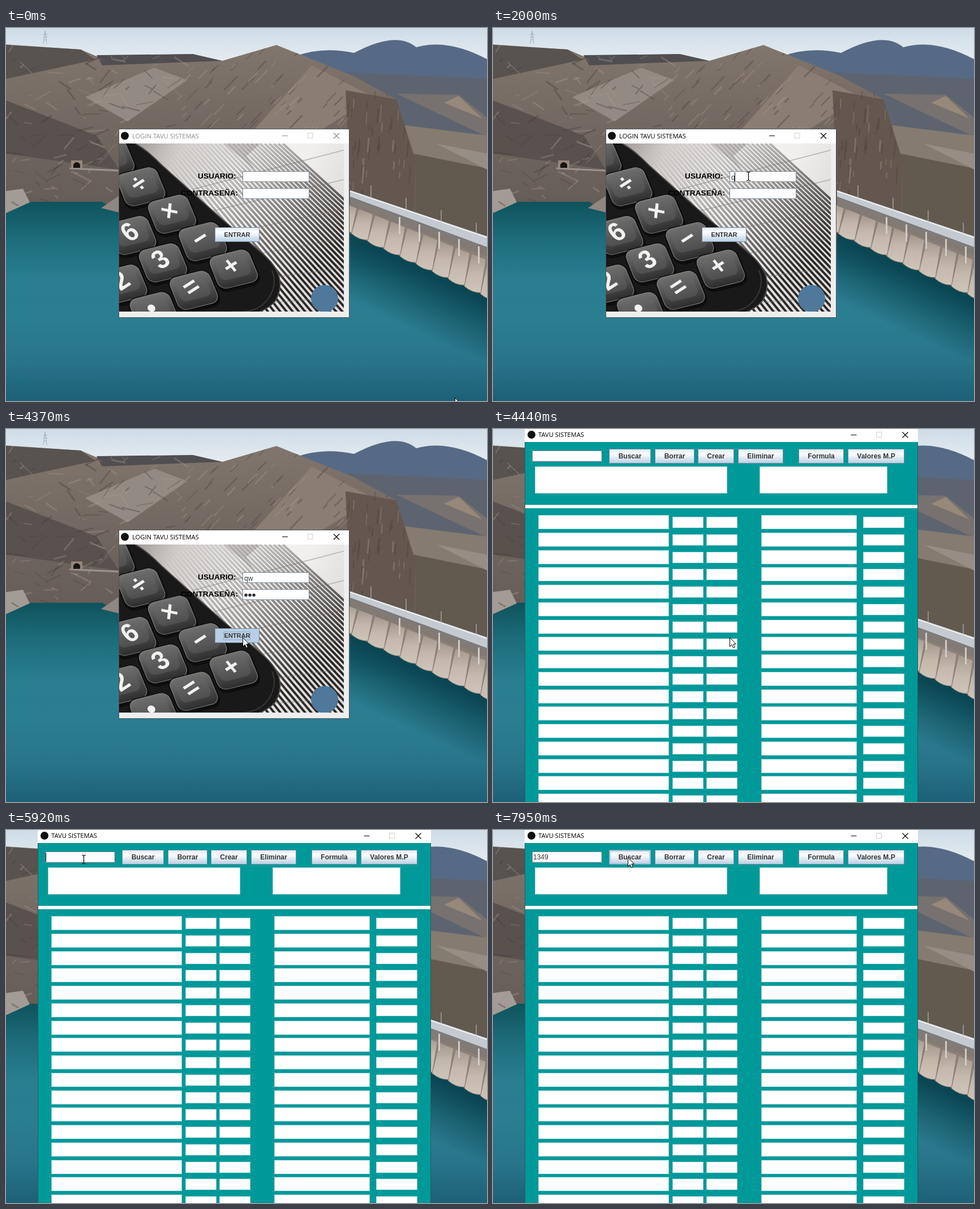
These frames come from a looping animation (850 by 659 pixels, 8000 ms). An HTML page:

```html
<!DOCTYPE html>
<html lang="es">
<head>
<meta charset="utf-8">
<style>
html, body { margin: 0; width: 100%; height: 100%; overflow: hidden; background: #1f6c80; }
svg { display: block; width: 850px; height: 659px; }
text { white-space: pre; }
.title { font: 11.2px "Open Sans", "Noto Sans", sans-serif; }
.bold { font-family: "Liberation Sans", Arial, sans-serif; font-weight: bold; }
.input { font: 12px "Liberation Sans", Arial, sans-serif; fill: #333; }
</style>
</head>
<body>
<svg id="stage" viewBox="0 0 850 659" xmlns="http://www.w3.org/2000/svg"></svg>
<script>
const LOOP = 8000, TICK = 70, MAIN_OPENS = 4440;
const stage = document.getElementById('stage');
const ruler = document.createElement('canvas').getContext('2d');

const textWidth = (str, weight = '') => {
  ruler.font = `${weight} 12px "Liberation Sans", Arial, sans-serif`;
  return ruler.measureText(str).width;
};
const rect = (x, y, w, h, fill, extra = '') =>
  `<rect x="${x}" y="${y}" width="${w}" height="${h}" fill="${fill}" ${extra}/>`;
const box = (x, y, w, h, fill, stroke) =>
  rect(x + .5, y + .5, w - 1, h - 1, fill, `stroke="${stroke}"`);
const path = (d, fill, extra = '') => `<path d="${d}" fill="${fill}" ${extra}/>`;
const line = (d, stroke, width = 1, extra = '') =>
  path(d, 'none', `stroke="${stroke}" stroke-width="${width}" ${extra}`);
const label = (x, y, str, size, extra = '') =>
  `<text class="bold" x="${x}" y="${y}" font-size="${size}" ${extra}>${str}</text>`;
const disc = (x, y, r, fill) => `<circle cx="${x}" cy="${y}" r="${r}" fill="${fill}"/>`;
const repeat = (n, fn) => Array.from({ length: n }, (_, i) => fn(i)).join('');
const gradient = (id, colors, extra = 'x2="0" y2="1"') =>
  `<linearGradient id="${id}" ${extra}>${colors.map((c, i) =>
    `<stop offset="${i / (colors.length - 1)}" stop-color="${c}"/>`).join('')}</linearGradient>`;

function seeded(seed) {
  return () => (seed = seed * 16807 % 2147483647) / 2147483647;
}

const LAND = 'M0 29L132 38 160 50 330 46 382 58 478 30 612 84 690 126 724 235V330L608 300V380H200V325L170 307H42L0 327Z';

const defs = `<defs>
${gradient('sky', ['#cfdce6', '#e9eff3'])}
${gradient('water', ['#0d5058', '#1d6c7b', '#2a7e90', '#2b7d90', '#28758a', '#1d6077'])}
${gradient('rock', ['#81766d', '#6f655f', '#605853'])}
${gradient('button', ['#dde8f3', '#fdfeff', '#dbe6f1', '#b8cfe5'])}
${gradient('key', ['#727271', '#515050', '#2e2d2d'])}
${gradient('paper', ['#8d8784', '#d5d1cf', '#f5f4f3', '#f0efee', '#dedcda'], 'x2="1" y2=".4"')}
${gradient('stripe', ['#45403e00', '#45403e77', '#2a2725'],
  'gradientUnits="userSpaceOnUse" x1="300" y1="204" x2="510" y2="450"')}
${gradient('concrete', ['#a3978c', '#c4b8ad', '#cfc4b9'])}
${gradient('damShade', ['#0b4653', '#0b465300'], 'gradientUnits="userSpaceOnUse" x1="690" y1="410" x2="648" y2="500"')}
<clipPath id="photoClip">${rect(200, 204, 397, 297, '#000')}</clipPath>
<clipPath id="landClip">${path(LAND, '#000')}</clipPath></defs>`;

// Slanted strata in the middle, loose rubble to the left, steep cracks on the cliff.
function strata() {
  const random = seeded(11);
  return repeat(320, i => {
    const x = random() * 724, y = 40 + random() * 270, size = 8 + random() * 26;
    const angle = x < 300 ? random() * 2 - 1 : x < 600 ? -.8 : -1.5;
    return line(`M${x} ${y}l${size * Math.cos(angle)} ${size * Math.sin(angle)}`,
      i % 2 ? '#443b37' : '#a79a8e', 1 + random() * 2, 'opacity=".38"');
  });
}

function dam() {
  const pier = i => {
    const x = 582 + i * 28.5, top = 318 + (x - 608) * .4, foot = 362 + (x - 608) * .467;
    return path(`M${x + 13} ${top}L${x + 38} ${top + 10}L${x + 29} ${foot + 11}Q${x + 14} ${foot + 12} ${x} ${foot}Z`,
      'url(#concrete)', 'stroke="#8d8279"');
  };
  return path('M608 360L850 472V590L608 480Z', 'url(#damShade)') +
    path('M608 300L850 386V474L608 362Z', '#8b8078') +
    repeat(11, pier) +
    path('M608 300L850 386V404L608 314Z', '#827a74') +
    path('M608 287L850 368V389L608 300Z', '#c4cad0') +
    line('M608 288L850 370', '#eef1f4', 2) + line('M608 299L850 388', '#727579', 2) +
    repeat(5, i => rect(694 + i * 35, 334 + i * 13, 3, 30, '#d0ccc7')) +
    repeat(5, i => line(`M${645 + i * 62} ${278 + i * 22}v24`, '#c2c7cb'));
}

const landscape = () =>
  rect(0, 0, 850, 70, 'url(#sky)') +
  path('M510 50Q560 32 615 44 Q690 4 725 34 Q780 18 850 55V200H510Z', '#566a85') +
  path('M600 78L850 90V220H690Z', '#5d6470') +
  path('M690 116L800 118 850 158V192Z', '#77716f') +
  path('M774 132L800 120 842 160Z', '#968979') +
  rect(0, 300, 850, 359, 'url(#water)') +
  path('M690 170L850 190V392L608 300V280Z', '#857b70') +
  path('M710 220L850 248V392L608 300Z', '#62594f') +
  path('M760 204L850 222V250Z', '#968d85') +
  path(LAND, 'url(#rock)') +
  path('M0 30L132 38 158 56 0 90Z', '#58534f') +
  path('M160 48L330 46 382 58 170 66Z', '#504e51') +
  path('M140 122L262 70 320 92 215 165Z', '#938a83') +
  path('M0 128L160 190 200 250 0 222Z', '#59514d') +
  path('M0 288L30 284 42 308 0 327Z', '#a39b95') +
  path('M168 318L200 296V326Z', '#8f8781') +
  path('M540 66L650 122 560 178H440Z', '#8a7d73') +
  path('M600 110L690 126 724 235 720 325 608 290Z', '#63574f') +
  `<g clip-path="url(#landClip)">${strata()}</g>` +
  line('M112 248L200 252', '#9b938d', 3) +
  path('M115 234h20v14h-20Z', '#96877b') + path('M119 247v-6q6-8 12 0v6Z', '#171514') +
  line('M66 28L69 5 72 28M66 11h7M66 16h7M67 21h5', '#a6afb7') +
  dam();

function calculatorPhoto() {
  const key = (sign, column, row) => {
    const x = 184 + column * 54.5 - row * 16, y = 231 + column * 48.5 + row * 86;
    return sign === ' ' ? '' : `<g transform="translate(${x} ${y}) rotate(-14) skewX(8)">
      ${rect(-39, -31, 78, 69, '#0d0d0d', 'rx="17"')}${rect(-36, -29, 72, 60, 'url(#key)', 'rx="14" stroke="#858482"')}
      ${rect(-28, -25, 56, 42, '#686766', 'rx="11" opacity=".4"')}
      ${label(0, 9, sign, 46, 'text-anchor="middle" fill="#f2f2f0" transform="rotate(-18)"')}</g>`;
  };
  const keyRows = ['−÷×−+', ' 63=', '  2•'];
  const keys = keyRows.map((signs, row) =>
    [...signs].map((sign, i) => key(sign, i - Math.max(0, row - 1), row)).join('')).join('');
  const stripe = i => line(`M${225 + i * 8} 204L${455 + i * 11} 505`, 'url(#stripe)', 4);
  const edge = 'M228 204Q250 216 275 242L382 338 455 400Q500 440 476 482 466 495 440 505';
  return `<g clip-path="url(#photoClip)">${rect(200, 204, 397, 297, 'url(#paper)')}
    ${path('M385 204H450L425 226 440 250Z', '#a8a3a0', 'opacity=".45"')}
    ${repeat(34, stripe)}
    ${repeat(6, i => line(`M${330 + i * 28} ${285 + i * 40}L600 ${215 + i * 52}`, '#77716e', 1.5, 'opacity=".45"'))}
    ${path(edge + 'H200V204Z', '#191919')}${line(edge, '#494746', 2)}
    ${line('M470 428Q481 455 462 480T400 501', '#3a3939', 2)}
    ${keys}${disc(563, 478, 24, '#4f789b')}</g>`;
}

const controls = (x, y) => line(`M${x - 5} ${y + .5}h10`, 'currentColor') +
  line(`M${x + 40} ${y - 4.5}h9v9h-9Z`, '#cfcfc4') +
  line(`M${x + 86} ${y - 4.5}l10 10m0 -10l-10 10`, 'currentColor', 1.2);

const button = (x, y, w, h, str, size, fill = 'url(#button)') =>
  box(x, y, w, h, fill, '#7a8a99') +
  label(x + w / 2, y + h / 2 + size * .36, str, size, 'fill="#333" text-anchor="middle"');

const login = `<g id="login">
  ${box(199, 178, 408, 334, '#eeeeee', '#4b5357')}${rect(200, 179, 406, 25, '#fff')}
  ${disc(210, 190.5, 7, '#111')}
  <g id="loginBar"><text class="title" x="223" y="194.5" fill="currentColor">LOGIN TAVU SISTEMAS</text>${controls(493, 190)}</g>
  ${calculatorPhoto()}
  ${label(339, 266, 'USUARIO:', 13.7)}${label(309, 296, 'CONTRASEÑA:', 13.7)}
  ${box(418, 253, 118, 19, '#fff', '#7a8a99')}${box(418, 283, 118, 19, '#fff', '#7a8a99')}
  <text id="user" class="input" x="421" y="268"></text>
  <g id="dots">${repeat(3, i => disc(424 + i * 7, 293.5, 2.8, '#333'))}</g>
  ${button(369, 352, 79, 26, 'ENTRAR', 11)}
  <g id="enterHover">${line('M370.5 353.5h76v23h-76Z', '#b8cfe5', 2)}</g>
  <g id="enterPressed">${button(369, 352, 79, 26, 'ENTRAR', 11, '#b8cfe5')}${line('M384.5 358.5h47v14h-47Z', '#93aac1')}</g></g>`;

function toolbar(x, names) {
  return names.map(name => {
    const width = Math.round(textWidth(name, 'bold') + 33), left = Math.round(x);
    x += width + 6.5;
    return button(left, 35, width, 26, name, 12);
  }).join('');
}

function tableRow(i) {
  const y = Math.round(152 + i * 30.75);
  const cell = (x, w) => box(x, y, w, 25, '#fff', '#a0d0d4');
  const small = (x, w) => box(x, y + 3, w, 20, '#fff', '#a0d0d4');
  return cell(80, 231) + small(317, 55) + small(377, 55) + cell(474, 169) + small(654, 73);
}

const mainWindow = `<g id="main">
  ${rect(56, 0, 695, 659, '#31585a')}${rect(57, 0, 693, 659, '#009999')}${rect(56, 0, 695, 23, '#fff')}
  ${disc(68, 10, 7, '#111')}
  <text class="title" x="80" y="14">TAVU SISTEMAS</text>${controls(637.5, 10)}
  ${box(69, 38, 124, 20, '#fff', '#6d8588')}${line('M70 56.5H191.5V39', '#c5d0d2')}
  <text id="search" class="input" x="71" y="52.3"></text>
  ${toolbar(205, ['Buscar', 'Borrar', 'Crear', 'Eliminar'])}${toolbar(540, ['Formula', 'Valores M.P'])}
  <g id="searchHover">${line('M206.5 36.5h71v23h-71Z', '#a9c3dc', 2)}</g>
  ${box(74, 66, 340, 48, '#fff', '#a0d0d4')}${box(471, 66, 226, 48, '#fff', '#a0d0d4')}
  ${rect(57, 134, 693, 6, '#fff')}${repeat(17, tableRow)}</g>`;

stage.innerHTML = defs + landscape() + login + mainWindow + `
  ${rect(0, 0, 1, 16, '#111', 'id="caret"')}
  <g id="arrow">${path('M.5 .5V16.5L4.2 13 6.7 18.6 9.3 17.5 6.9 12H11.5Z', '#fff', 'stroke="#000"')}</g>
  <g id="beam">${line('M-3 -7.5H-1L.5 -6.5 2 -7.5H4M.5 -6.5V6.5M-3 7.5H-1L.5 6.5 2 7.5H4', '#000', 1.2)}</g>`;

const el = Object.fromEntries([...stage.querySelectorAll('[id]')].map(e => [e.id, e]));
const show = (e, on) => e.setAttribute('display', on ? 'inline' : 'none');
const place = (e, x, y) => e.setAttribute('transform', `translate(${x} ${y})`);

const MOVES = [
  { start: 70, end: 870, x: 451, y: 262 },
  { start: 3510, end: 4310, x: 418, y: 368 },
  { start: 4910, end: 5660, x: 143, y: 56 },
  { start: 5790, end: 5920, x: 137, y: 52 },
  { start: 7390, end: 7950, x: 238, y: 48 }
];

// Each move speeds up, runs a little past its end point and settles.
function overshoot(u) {
  const v = u ** 1.4 - 1;
  return 1 + 2.1 * v ** 3 + 1.1 * v ** 2;
}

function pointer(t) {
  let x = 793, y = 653;
  for (const move of MOVES) {
    if (t < move.start) break;
    const elapsed = (Math.floor((t - move.start) / TICK) + 1) * TICK;
    const u = overshoot(Math.min(1, elapsed / (move.end - move.start + TICK)));
    x += (move.x - x) * u;
    y += (move.y - y) * u;
  }
  return [Math.round(x), Math.round(y)];
}

const FIELDS = [
  { id: 'user', text: 'qw', x: 420, y: 255, focus: 1100, blur: 2280, keys: [2000, 2130] },
  { id: 'dots', text: '000', x: 420, y: 285, focus: 2280, blur: 4310, keys: [2680, 2810, 3010] },
  { id: 'search', text: '1349', x: 70, y: 40, focus: 4550, blur: 7950, keys: [6460, 6720, 6920, 6990] }
];

function drawField({ id, text, x, y, focus, blur, keys }, t) {
  const pressed = keys.filter(key => t >= key);
  const typed = text.slice(0, pressed.length);
  if (id === 'dots') [...el.dots.children].forEach((dot, i) => show(dot, i < typed.length));
  else el[id].textContent = typed;
  if (t < focus || t >= blur) return;
  show(el.caret, (t - (pressed.pop() ?? focus)) % 1000 < 500);
  place(el.caret, Math.round(x + textWidth(typed)), y);
}

function draw(t) {
  const inMain = t >= MAIN_OPENS;
  show(el.login, !inMain);
  show(el.main, inMain);
  el.loginBar.setAttribute('color', t < 1070 ? '#8b8b8b' : '#000');
  show(el.caret, false);
  FIELDS.forEach(field => drawField(field, t));

  const [x, y] = pointer(t);
  const over = (left, top, w, h) => x >= left && x < left + w && y >= top && y < top + h;
  const overField = inMain ? over(69, 38, 124, 21) : over(418, 253, 118, 19) || over(418, 283, 118, 19);
  show(el.enterHover, over(369, 352, 79, 26));
  show(el.enterPressed, t >= 4310);
  show(el.searchHover, over(205, 35, 74, 26));
  show(el.arrow, !overField);
  show(el.beam, overField);
  place(overField ? el.beam : el.arrow, x, y);
}

const begin = performance.now();
function tick() {
  draw((performance.now() - begin) % LOOP);
  requestAnimationFrame(tick);
}
tick();
</script>
</body>
</html>
```
